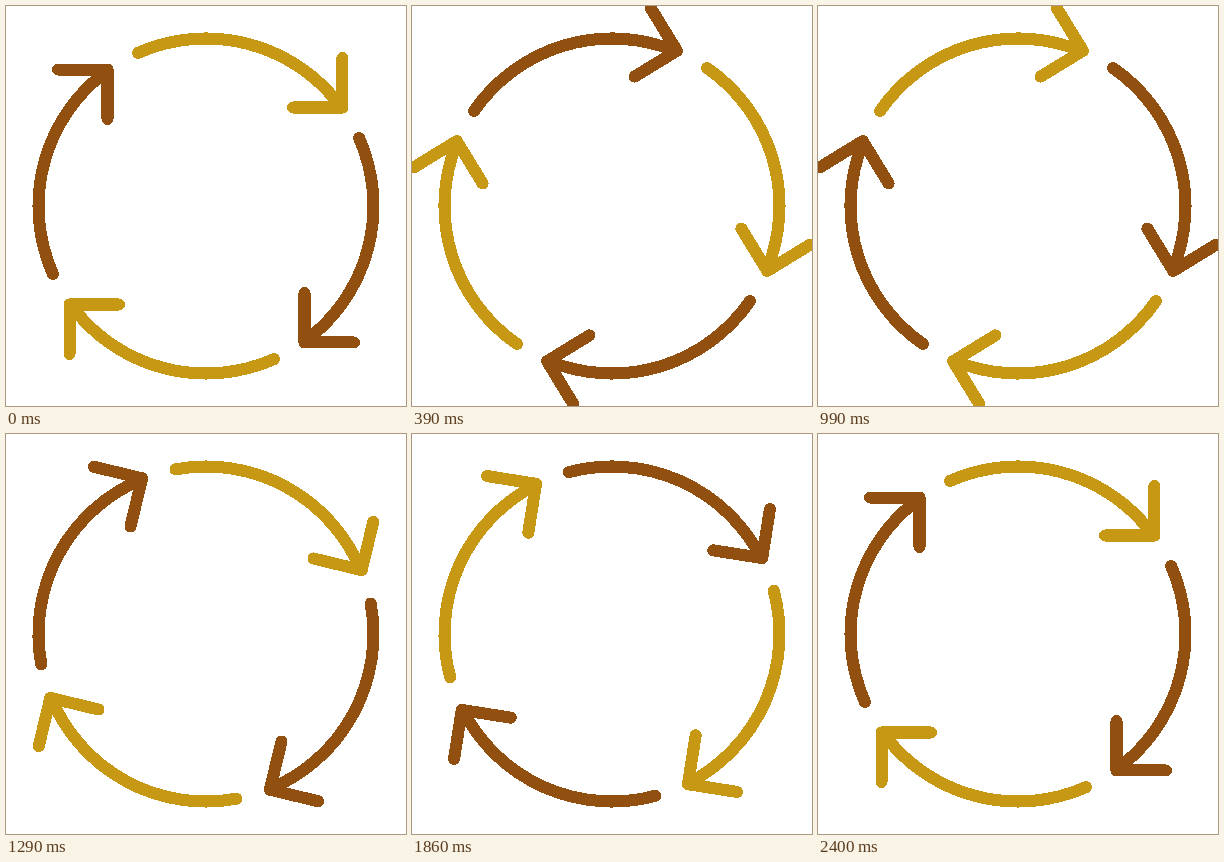
Write an HTML page that moves like this. It is 400 by 400 pixels and loops after 2.43 s.

```html
<!DOCTYPE html>
<html lang="en">
<head>
<meta charset="utf-8">
<title>Rotating arrows</title>
<style>
  html, body { margin: 0; width: 100%; height: 100%; overflow: hidden; background: #fff; }
  svg { display: block; width: 100vw; height: 100vh; }
</style>
</head>
<body>
<svg viewBox="-200 -200 400 400" shape-rendering="crispEdges">
  <defs>
    <path id="arrow" d="M-68 -153.07A167.5 167.5 0 0 1 135.6 -98.33M136.45 -148V-98.5H87"/>
  </defs>
  <g id="ring" fill="none" stroke-width="12.06" stroke-linecap="round" stroke-linejoin="round">
    <use href="#arrow" stroke="#c69814"/>
    <use href="#arrow" stroke="#915010" transform="rotate(90)"/>
    <use href="#arrow" stroke="#c69814" transform="rotate(180)"/>
    <use href="#arrow" stroke="#915010" transform="rotate(270)"/>
  </g>
</svg>
<script>
  const LOOP = 2430, STEP = 30, DEGREES_PER_STEP = 4.5;
  const ring = document.getElementById('ring');

  // The last step of the loop repeats the starting pose.
  function draw() {
    const step = Math.floor((performance.now() % LOOP) / STEP);
    ring.setAttribute('transform', `rotate(${step * DEGREES_PER_STEP})`);
    requestAnimationFrame(draw);
  }
  draw();
</script>
</body>
</html>
```
